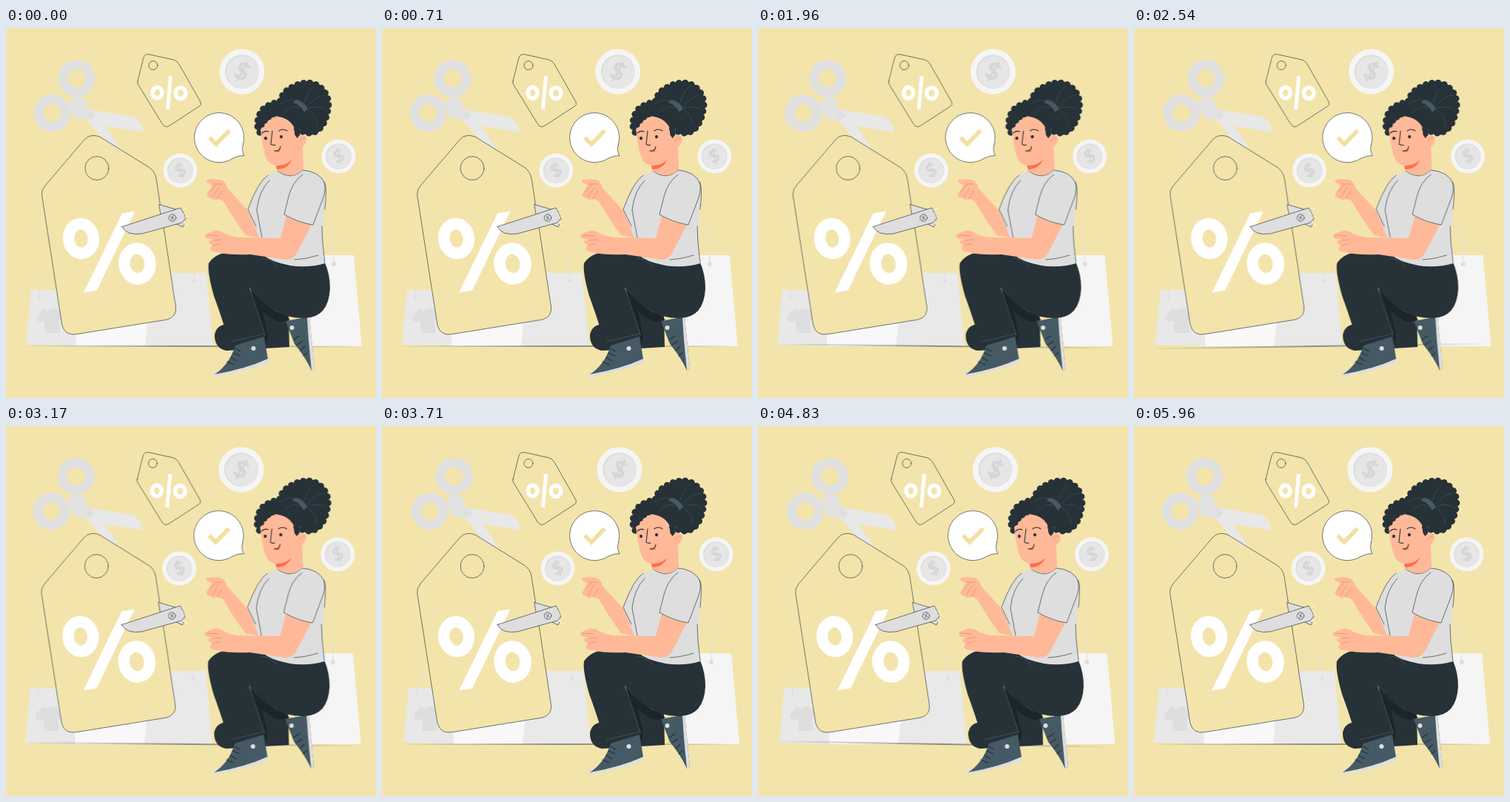
These frames come from a looping animation (500x500 px, 6000 ms). An HTML page:

```html
<!DOCTYPE html>
<html lang="en">
<head>
<meta charset="utf-8">
<title>Discount shopping</title>
<style>
  html, body { margin: 0; width: 100%; height: 100%; overflow: hidden; background: #f3e4ab; }
  svg { display: block; width: 100%; height: 100%; }
  .back { animation: shake 6s linear -40ms infinite; }
  .front { animation: shake 3s linear -40ms infinite; }
  .floor { fill: #263238; transform-origin: 250px 430px; animation: sway 1.5s linear -40ms infinite; }
  @keyframes shake {
    0%, 100% { transform: translateX(0); }
    10%, 90% { transform: translateX(-1px); }
    20%, 80% { transform: translateX(2px); }
    30%, 50%, 70% { transform: translateX(-4px); }
    40%, 60% { transform: translateX(4px); }
  }
  @keyframes sway {
    0%, 50%, 100% { transform: rotate(0deg); }
    25% { transform: rotate(1deg); }
    75% { transform: rotate(-1deg); }
  }
  .dark { fill: #263238; }
  .deep { fill: #1b252a; }
  .skin { fill: #ffb998; }
  .red { fill: #ff6f4d; }
  .cloth { fill: #dedede; }
  .shoe { fill: #455a64; }
  .paper { fill: #f3e4ab; }
  .ink { stroke: #263238; stroke-width: .65; stroke-linejoin: round; stroke-linecap: round; }
  .line { fill: none; }
  .thick { stroke-width: 1.1; }
  .percent { fill: none; stroke: #fff; }
  .handle { fill: none; stroke: #dfdfdf; stroke-width: 1; }
  .coin text { font: 900 32px Lato, Arial, sans-serif; text-anchor: middle; fill: #d6d6d6; }
</style>
</head>
<body>
<svg viewBox="0 0 500 500">
  <defs>
    <g id="coin" class="coin">
      <circle r="30.5" fill="#f5f5f5"/>
      <circle r="23" fill="#dedede"/>
      <circle cx=".7" cy=".7" r="21.5" fill="#e6e6e6"/>
    </g>
  </defs>

  <g class="back">
    <!-- bags -->
    <path d="M34 354H110V430L27 428Z" fill="#e8e8e8"/>
    <path d="M90 354H200L190 430H95Z" fill="#f8f8f8"/>
    <path d="M198 331H271L280 430H188Z" fill="#e9e9e9"/>
    <path d="M400 307H470L481 430H392Z" fill="#f5f5f5"/>
    <path class="cloth" d="M51 379Q58 384 65 378L76 384V396L71 395L73 412H53L52 396L43 397L41 390Z"/>
    <path class="handle" d="M45 363Q44 334 60 333M222 312Q224 298 238 299Q253 304 255 342M421 290Q424 263 436 267Q444 278 443 318"/>
    <g class="cloth"><circle cx="45" cy="364" r="1.8"/><circle cx="254.500" cy="342" r="2.300"/><circle cx="443" cy="319" r="3"/></g>

    <!-- scissors -->
    <path d="M97 117L112 127L136 156L157 166L122 115Z" fill="#e8e8e8"/>
    <path d="M106 109L172 120Q184 126 186 141L118 130Z" fill="#e8e8e8"/>
    <path d="M84 103L93 92L107 95L110 112L121 118L114 125L100 123L92 121L88 110Z" fill="#e2e2e2"/>
    <g fill="none" stroke="#e0e0e0" stroke-width="13"><circle cx="95.500" cy="68" r="18.500"/><circle cx="62.500" cy="115" r="18.500"/></g>
    <g fill="none" stroke="#d6d6d6" stroke-width=".8"><circle cx="113.500" cy="116" r="5"/><path d="M111 114L116 118M115 113L112 119"/></g>

    <!-- coins -->
    <g class="coin">
      <use href="#coin" x="319" y="59"/>
      <text transform="translate(319 59) rotate(24)" y="11">$</text>
      <use href="#coin" transform="translate(235.500 192.500) scale(.755)"/>
      <text transform="translate(235.500 192.500) rotate(-24) scale(.755)" y="11">$</text>
      <use href="#coin" transform="translate(449.500 173.500) scale(.755)"/>
      <text transform="translate(449.500 173.500) rotate(-20) scale(.755)" y="11">$</text>
    </g>
  </g>

  <path class="floor" d="M17.500 430L134 429.750L250 429.500L366 429.750L482.500 430L366 430.250L250 430.500L134 430.250Z"/>

  <g class="front">
    <!-- small tag -->
    <path class="paper ink" d="M178 72L186 40Q188 34 195 36L227 43Q231 44 234 49L263 100Q265 104 261 106L221 132Q215 136 211 129L179 77Q177 74 178 72Z"/>
    <circle class="line ink" cx="199" cy="50.500" r="6"/>
    <g class="percent" stroke-width="5.500">
      <ellipse cx="204.500" cy="87.500" rx="6.500" ry="7.500"/>
      <ellipse cx="236" cy="88" rx="6.800" ry="7.500"/>
      <path d="M222.500 65L218.500 110" stroke-width="5"/>
    </g>

    <!-- speech bubble -->
    <path class="ink" fill="#fff" d="M320.500 157A33.500 33.500 0 1 0 306 176.500Q314 172 322 172.500Q318 166 320.500 157Z"/>
    <path d="M275 148L284 157L302 138.500" fill="none" stroke="#f3dfa0" stroke-width="5.500"/>

    <!-- large tag -->
    <path class="paper ink" d="M48.500 225Q48 219 53 213L106 151Q114 142 127 147L193 188Q201 193 203 203L229.500 377Q231 390 218 394L97 413.500Q80 417 76 402Z"/>
    <circle class="line ink" cx="123" cy="189.500" r="16"/>
    <g class="percent" stroke-width="15.500">
      <ellipse cx="101.500" cy="284.500" rx="16.800" ry="20" transform="rotate(-8 101.500 284.500)"/>
      <ellipse cx="177.500" cy="318.500" rx="17.500" ry="20.500" transform="rotate(-8 177.500 318.500)"/>
    </g>
    <path d="M157 250.500L174.500 247.500L123 354.500L105 357.500Z" fill="#fff"/>

    <!-- blades -->
    <path class="cloth ink" d="M207 238.500L236 247L243 261L239 269L210 255Z"/>
    <path class="cloth ink" d="M157 268.500L236 243L240 250L243 257L238 263L184 278Q163 281 157 268.500Z"/>
    <path d="M237 242L242 248L240 251L246 256L240 262L243 269L249 262V245Z" class="paper"/>
    <path class="line" stroke="#fbf4db" d="M240 246L245 243M242 255H246M240 263L246 267"/>
    <circle class="line ink" cx="225" cy="256.500" r="4.800"/>
    <path class="line ink" d="M222.500 254.500L227.500 258.500M226.500 253.500L223.500 259.500"/>

    <!-- rear leg and shoe -->
    <path class="dark" d="M326 355L382 388L383 431L350 433L298 436Q282 433 282 415Q284 402 298 400L320 403Z"/>
    <path class="deep" d="M330 352L384 394Q371 401 357 391L347 383L354 417L350 432Z"/>
    <path class="shoe" d="M378 396L410 390L413 421L417 460L413 463Q405 445 390 427Z"/>
    <path class="cloth" d="M410 390L417 460L413 463L409 421L407 391Z"/>
    <circle cx="386.500" cy="405" r="3" class="cloth"/>
    <path class="line ink thick" d="M389 421L397 416M393 428L401 423M398 436L404 430M402 443L407 439"/>

    <!-- front shoe -->
    <path class="cloth" d="M279 472L285 463L354 445L355 452Q330 462 279 472Z"/>
    <path class="shoe" d="M310 429L349 417L354 447Q323 461 282 468Q302 455 310 429Z"/>
    <circle cx="334.500" cy="433" r="3" class="cloth"/>
    <path class="line ink thick" d="M310 433L317 437M307 439L316 443M304 445L312 450M299 451L308 455"/>

    <!-- trousers -->
    <path class="dark" d="M274 318Q283 304 303 303L350 307L431 317Q438 333 438 352Q436 391 404 392Q384 393 366 383L329 351L352 416L302 428Q296 403 281 362Q272 330 274 318Z"/>
    <path class="line" stroke="#53636b" stroke-width=".6" d="M346 311Q360 312 368 324M330 352L350 415M304 424L350 413M336 358Q350 373 369 385"/>

    <!-- far arm -->
    <path class="skin" d="M271 206Q274 203 290 205Q298 208 299 216L327 247L344 284L324 280Q309 260 294 234L287 231L281 232L274 229Q269 226 274 221L279 212L272 209Z"/>
    <path class="line" stroke="#e78d70" stroke-width=".7" d="M279 211L293 211M275 222L284 212M279 229L288 215M286 231L293 219"/>

    <!-- shirt -->
    <path class="cloth" d="M354 199L367 193Q385 203 400 191Q422 193 431 209Q434 218 430 248L428 280L431 318Q398 328 362 315L352 310L341 281L327 245Q341 208 354 199Z"/>
    <path class="line ink" d="M367 193Q385 207 401 192Q424 194 431 210Q434 217 431 245M354 199Q341 207 327 245L338 268M356 206Q342 220 339 246L346 283M427 268L428 290L431 317"/>

    <!-- near arm -->
    <path class="skin" d="M380 250L371 284L318 283Q307 283 296 278Q286 271 279 275L271 278Q266 282 273 285L281 286L274 288Q273 291 279 294L276 298Q277 303 286 303Q300 307 330 306L371 312Q387 316 393 304L414 264Z"/>
    <path class="cloth" d="M384 215L376 252Q394 264 415 266L430 225Q432 202 407 198Q391 200 384 215Z"/>
    <path class="line ink" d="M401 198Q387 208 382 228L376 252Q395 263 415 266L429 229Q433 217 430 208"/>
    <path class="line ink" d="M390 313Q407 312 422 307"/>
    <path class="line" stroke="#e78d70" stroke-width=".7" d="M272 280L288 281M279 287L293 286M280 294L291 291"/>

    <!-- bun and hair -->
    <path class="dark" d="M342 143Q335 130 344 111Q353 100 368 99Q372 84 387 78Q404 68 419 74Q437 82 437 103Q437 126 425 139Q412 149 400 141L393 130L360 125Z"/>
    <path class="line" stroke="#263238" stroke-width="9" stroke-linecap="round" stroke-dasharray="0 8.500" d="M343 141Q336 130 345 112Q355 102 370 100Q374 85 389 79Q404 71 418 76Q435 84 436 103Q434 127 423 137Q413 145 401 140"/>

    <!-- head -->
    <path class="skin" d="M365 179L366 192Q386 207 402 191L401 158L385 160Z"/>
    <path class="red" d="M365 186Q380 184 387 176Q382 191 366 191Z"/>
    <path class="skin" d="M344 136Q346 127 359 117Q381 113 391 128L395 148Q399 142 405 146Q409 151 403 159Q399 163 394 161Q392 176 380 183Q364 190 355 181Q348 173 344 136Z"/>
    <path class="dark" d="M342 137Q346 121 362 109Q389 105 397 132Q398 143 394 149Q389 145 390 135Q382 120 363 119Q352 125 344 137Z"/>
    <path class="line" stroke="#263238" stroke-width="7" stroke-linecap="round" stroke-dasharray="0 7" d="M346 131Q352 121 364 116Q383 114 391 129L394 143"/>
    <path d="M391 97Q401 97 408 109L403 114Q397 103 388 101Z" class="shoe"/>
    <path class="line" stroke="#43535b" stroke-width=".7" d="M407 106Q420 91 431 91M409 108Q424 103 434 112M408 110Q420 118 421 132M404 101Q406 88 417 79M370 103Q380 95 390 98M375 115Q386 103 397 108"/>
    <g class="dark"><ellipse cx="351" cy="149" rx="2" ry="2.300"/><ellipse cx="372" cy="147" rx="2" ry="2.300"/></g>
    <path class="line ink thick" d="M346 142Q350 138 355 140M369 139Q374 135 380 139M360 139L358 157Q361 159 364 158"/>
    <path class="red" d="M364 166Q370 167 372 160L370 167Q367 169 364 166Z"/>
    <path class="line ink thick" d="M363 166Q370 167 371 160"/>
    <path class="line" stroke="#e78d70" stroke-width=".7" d="M397 154Q399 148 404 149"/>
  </g>
</svg>
</body>
</html>
```
